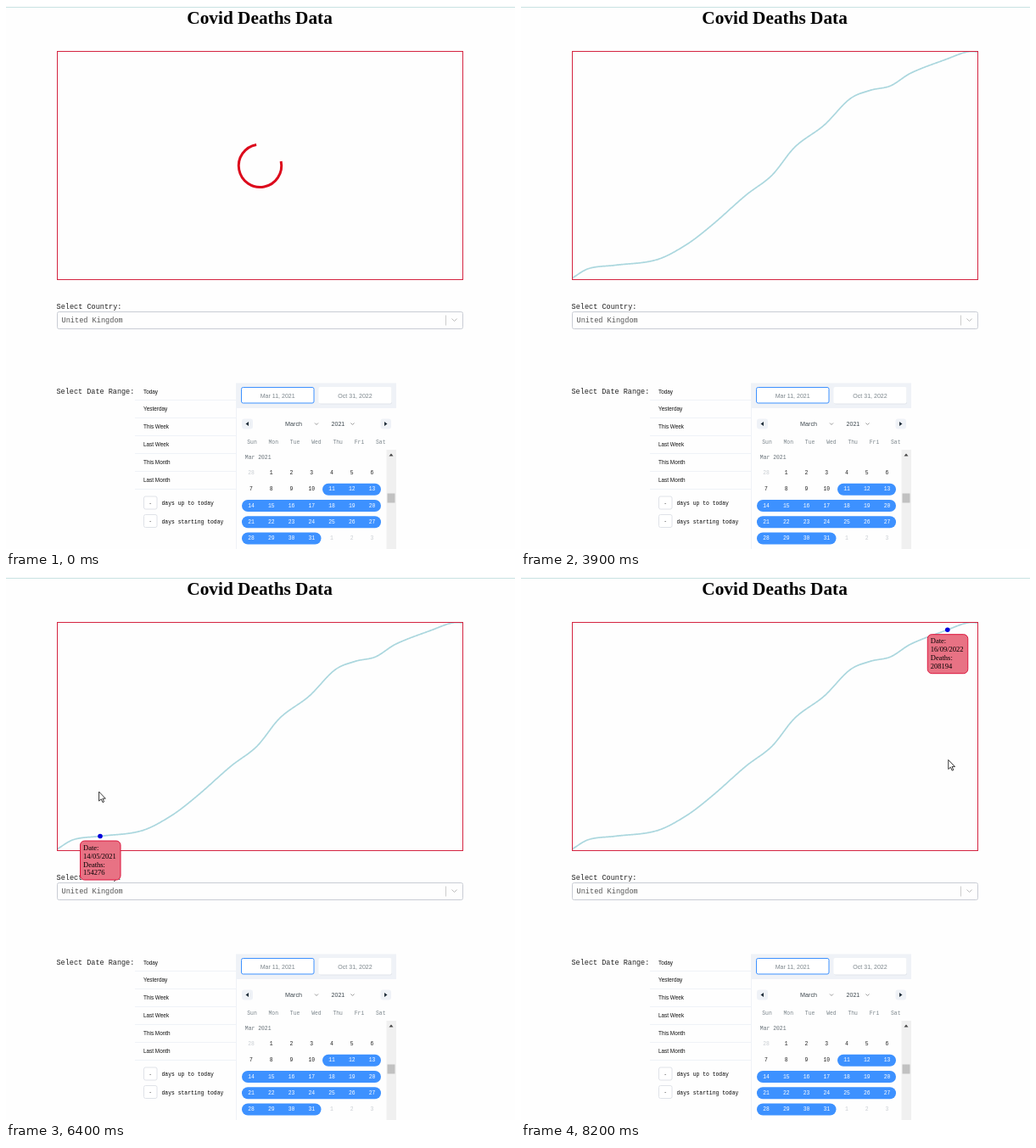
An HTML page for the animation above (8300 ms loop, 600 by 640 pixels).

```html
<!DOCTYPE html>
<html lang="en">
<head>
<meta charset="utf-8">
<title>Covid Deaths Data</title>
<style>
html, body { margin: 0; width: 100%; height: 100%; overflow: hidden; background: #fefefe; }
svg { display: block; width: 600px; height: 640px; }
text { white-space: pre; }
.serif { font-family: "Liberation Serif", "Times New Roman", serif; }
.mono { font-family: "Liberation Mono", "Courier New", monospace; }
.sans { font-family: "Liberation Sans", Arial, sans-serif; }
.mid { text-anchor: middle; }
</style>
</head>
<body>
<svg id="stage" viewBox="0 0 600 640">
  <defs><clipPath id="plot"><rect x="60" y="53" width="479" height="270"/></clipPath></defs>
  <rect width="600" height="640" fill="#fefefe"/>
  <rect y="1" width="600" height="1" fill="#c9e2e2"/>
  <text class="serif" font-weight="bold" x="213.3" y="21" font-size="21.3">Covid Deaths Data</text>
  <g id="page"></g>
  <path id="line" clip-path="url(#plot)" fill="none" stroke="#abd7de" stroke-width="1.7" pathLength="1" stroke-dasharray="1 2"/>
  <rect x="60.5" y="53.5" width="478" height="269" fill="none" stroke="#d42340"/>
  <path id="spinner" fill="none" stroke="#dc0a1c" stroke-width="3"/>
  <g id="hover">
    <g id="tip" class="serif" font-size="8.5">
      <circle r="2.8" fill="#0000dd"/>
      <rect x="-23.5" y="5.5" width="47.5" height="46" rx="5" fill="#e87284" stroke="#dc143c"/>
      <text x="-20" y="16">Date:</text>
      <text id="date" x="-20" y="26"></text>
      <text x="-20" y="36">Deaths:</text>
      <text id="deaths" x="-20" y="45.8"></text>
    </g>
    <path id="cursor" d="M0 0V11L2.6 8.7L4.4 12.6L6 11.9L4.3 8.1H7.7Z" fill="#fff" stroke="#222" stroke-width=".9" stroke-linejoin="round"/>
  </g>
</svg>
<script>
const LOOP = 8300, STEP = 100;
const DRAW_START = 2680, DRAW_TIME = 1000, HOVER_START = 4000, HOVER_END = 8100;
const LAST_DAY = 599;
const NS = "http://www.w3.org/2000/svg";
const $ = id => document.getElementById(id);
const page = $("page");

function add(tag, attrs, text) {
  const el = document.createElementNS(NS, tag);
  for (const k in attrs) el.setAttribute(k, attrs[k]);
  if (text !== undefined) el.textContent = text;
  page.appendChild(el);
}
function label(text, x, y, size, cls, fill = "#111") {
  add("text", { x, y, "font-size": size, class: cls, fill }, text);
}
function box(x, y, width, height, fill, stroke = "none", rx = 0) {
  add("rect", { x, y, width, height, fill, stroke, rx });
}
function shape(d, fill, stroke = "none") {
  add("path", { d, fill, stroke });
}
const chevron = (x, y, r, color) =>
  shape(`M${x - r} ${y - r / 2}l${r} ${r}l${r} ${-r}`, "none", color);

function buildSelect() {
  label("Select Country:", 59.5, 357, 8.55, "mono", "#222");
  box(60.5, 360.5, 478, 20, "#fefefe", "#c8ccd4", 2);
  label("United Kingdom", 65.5, 373, 8.6, "mono", "#555");
  box(518, 364.5, 1, 12, "#ccc");
  chevron(528.5, 370, 3, "#bbb");
}

function buildPresets() {
  label("Select Date Range:", 59.5, 456.5, 8.5, "mono", "#222");
  ["Today", "Yesterday", "This Week", "Last Week", "This Month", "Last Month"].forEach((name, i) => {
    const y = 456.5 + i * 20.9;
    label(name, 162, y, 6.4, "sans");
    box(152, Math.round(y + 7.5), 119, 1, "#eff2f7");
  });
  ["days up to today", "days starting today"].forEach((name, i) => {
    const y = 578 + i * 21.5;
    box(162.5, y, 15.5, 15, "#fff", "#dfe2e8", 2);
    label("-", 170.2, y + 9.5, 6.4, "mono mid", "#555");
    label(name, 183.5, y + 10, 6.4, "mono", "#000");
  });
}

function buildCalendar() {
  const pale = "#eff2f7", grey = "#7c868c", ink = "#3e484f", blue = "#3d91ff";
  box(271, 444.5, 1, 196, pale);
  box(271.5, 444.5, 188.5, 29.5, pale);
  box(369, 450, 86, 19.5, "#e2e6ec", "none", 2);
  box(368.5, 449, 86, 19.5, "#fff", "none", 2);
  box(277.5, 449.5, 85.5, 18.5, "#fff", blue, 2);
  label("Mar 11, 2021", 320.2, 461.8, 7.05, "sans mid", grey);
  label("Oct 31, 2022", 411.5, 461.8, 7.05, "sans mid", grey);

  box(278, 486.5, 13, 12, pale, "none", 3);
  box(441.5, 486.5, 12.5, 12, pale, "none", 3);
  shape("M286 490v5l-3.5 -2.5zM446 490v5l3.5 -2.5z", "#22303c");
  label("March", 329, 495, 7.2, "sans", ink);
  label("2021", 383.5, 495, 7.1, "sans", ink);
  chevron(366, 492.5, 2, "#999");
  chevron(408.5, 492.5, 2, "#999");

  ["Sun", "Mon", "Tue", "Wed", "Thu", "Fri", "Sat"].forEach((d, i) =>
    label(d, 290 + i * 25.3, 516, 6.4, "mono mid", grey));
  label("Mar 2021", 281.8, 534, 6.4, "mono", "#667077");

  const rowY = row => 552 + row * 19.25;
  const pill = (row, from, to) => box(from, rowY(row) - 8.5, to - from, 14, blue, "none", 7);
  pill(1, 373, 442);
  pill(2, 278, 442);
  pill(3, 278, 442);
  pill(4, 278, 371.5);
  for (let i = 0; i < 35; i++) {
    const outside = i < 1 || i > 31;
    const day = i < 1 ? 28 : i > 31 ? i - 31 : i;
    const fill = outside ? "#c8cdd2" : i >= 11 ? "#fff" : "#222";
    label(day, 289 + i % 7 * 23.75, rowY(Math.floor(i / 7)), 6.4, "mono mid", fill);
  }

  box(448.5, 523, 11.5, 117, "#f0f0f0");
  shape("M451.5 530.5h5l-2.5 -3z", "#444");
  box(449.5, 574.5, 9, 11, "#c1c1c1");
}

// Smooth curve through [x, y] points, flat where the direction turns.
function spline(pts) {
  const end = pts.length - 1;
  const slope = i => {
    const a = pts[Math.max(0, i - 1)], p = pts[i], b = pts[Math.min(end, i + 1)];
    return (p[1] - a[1]) * (b[1] - p[1]) < 0 ? 0 : (b[1] - a[1]) / (b[0] - a[0]);
  };
  return x => {
    let i = 0;
    while (i < end - 1 && x > pts[i + 1][0]) i++;
    const [x0, y0] = pts[i], [x1, y1] = pts[i + 1];
    const w = x1 - x0, u = (x - x0) / w, v = 1 - u;
    return y0 * v * v * (1 + 2 * u) + y1 * u * u * (3 - 2 * u)
      + w * u * v * (slope(i) * v - slope(i + 1) * u);
  };
}

// Day since 11 March 2021 -> cumulative deaths
const deathsOn = spline([
  [0, 150841], [25, 153400], [64, 154276], [125, 155700], [169, 159650], [207, 164800],
  [257, 172600], [295, 177750], [329, 185145], [372, 190850], [410, 197700], [440, 199950],
  [470, 201138], [500, 204470], [554, 208194], [582, 209960], [LAST_DAY, 210050]
]);
const dayX = day => 59.85 + day * 0.7995;
const countY = n => 305.5 - (n - 154276) / 221.6;

function buildLine() {
  const pts = [];
  for (let d = 0; d <= LAST_DAY; d++) pts.push(`${dayX(d).toFixed(2)} ${countY(deathsOn(d)).toFixed(2)}`);
  $("line").setAttribute("d", "M" + pts.join("L"));
}

// Time -> hovered day, sweeping back and forth
const sweep = spline([
  [HOVER_START, 568], [4500, 83], [5150, LAST_DAY], [5700, 470], [6400, 64],
  [7150, 23], [7400, 329], [HOVER_END, 554]
]);
const dayAt = t => Math.max(0, Math.min(LAST_DAY, sweep(Math.min(t, HOVER_END))));

const show = (el, on) => el.setAttribute("visibility", on ? "visible" : "hidden");
const move = (el, x, y) => el.setAttribute("transform", `translate(${x} ${y})`);

function drawSpinner(t) {
  const at = deg => {
    const a = deg * Math.PI / 180;
    return `${299.5 + 25.2 * Math.cos(a)} ${188.3 + 25.2 * Math.sin(a)}`;
  };
  const start = -12 + t * 0.3028;
  $("spinner").setAttribute("d", `M${at(start)}A25.2 25.2 0 1 1 ${at(start + 272)}`);
}
function drawHover(t) {
  const day = Math.round(dayAt(t)), n = deathsOn(day);
  move($("tip"), dayX(day), countY(n));
  // The pointer runs slightly ahead of the dot and sinks towards the left.
  move($("cursor"), dayX(dayAt(t + 10)) + 1, Math.max(215.5, 226 - (day - 329) * 0.102));
  const [yy, mm, dd] = new Date(Date.UTC(2021, 2, 11 + day)).toISOString().slice(0, 10).split("-");
  $("date").textContent = `${dd}/${mm}/${yy}`;
  $("deaths").textContent = Math.round(n);
}
function render(ms) {
  const t = Math.floor(ms % LOOP / STEP) * STEP;
  const loading = t < DRAW_START, hovering = t >= HOVER_START;
  show($("spinner"), loading);
  show($("line"), !loading);
  show($("hover"), hovering);
  if (loading) drawSpinner(t);
  else $("line").setAttribute("stroke-dashoffset", 1 - Math.min(1, (t - DRAW_START) / DRAW_TIME));
  if (hovering) drawHover(t);
}

buildSelect();
buildPresets();
buildCalendar();
buildLine();
const begin = performance.now();
function tick() {
  render(performance.now() - begin);
  requestAnimationFrame(tick);
}
tick();
</script>
</body>
</html>
```
